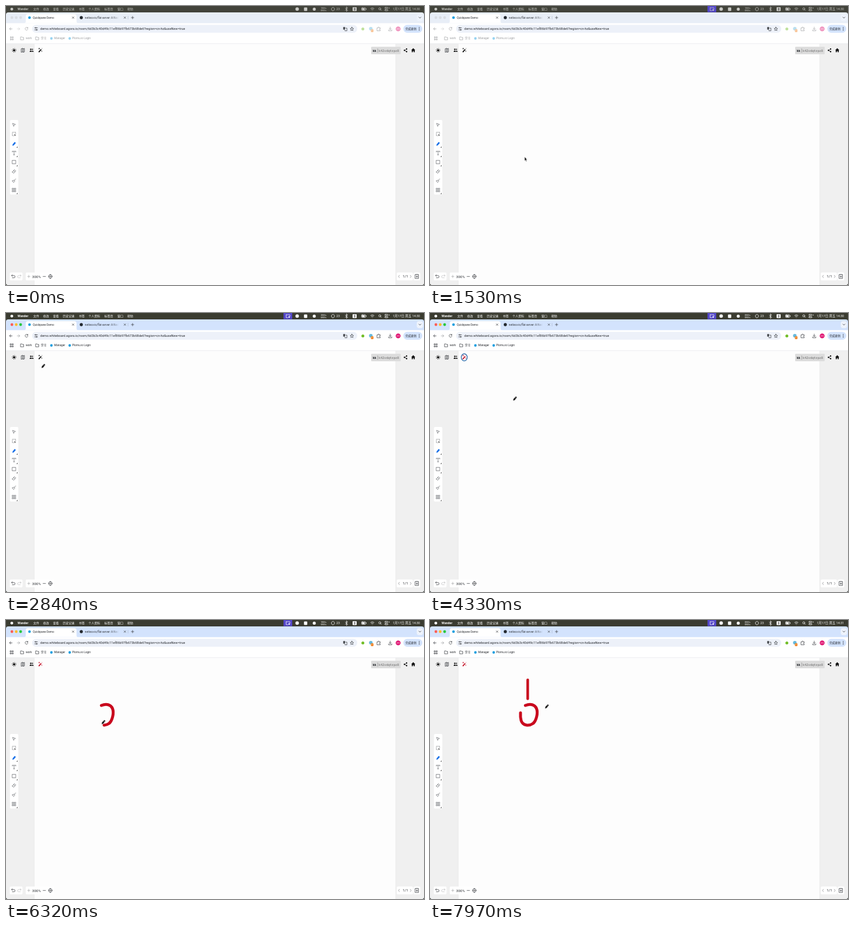
Animation, 720 px wide and 480 px high, one loop 8 s. Source, as an HTML page:

```html
<!DOCTYPE html>
<html lang="zh">
<head>
<meta charset="utf-8">
<title>Whiteboard</title>
<style>
  html, body { margin: 0; width: 100%; height: 100%; overflow: hidden; background: #fdfdfd; }
  svg {
    display: block; width: 100%; height: 100%;
    --menu: #3b3c31; --strip: #d3e3fd; --ink: #fff;
    --red: #fe5f57; --amber: #febc2e; --green: #28c840; --dim: 1;
  }
  svg.idle {
    --menu: #42433b; --strip: #e8eef7; --ink: #c9c9c5;
    --red: #d9dde3; --amber: #d9dde3; --green: #d9dde3; --dim: .45;
  }
  text { font-family: Roboto, "Noto Sans CJK SC", "Noto Sans CJK", sans-serif; white-space: pre; }
  .mono { font-family: "Noto Sans Mono", "Liberation Mono", monospace; }
  .bold { font-weight: 700; }
  .line { fill: none; stroke: #3a3d42; stroke-width: .75; stroke-linecap: round; stroke-linejoin: round; }
  .tools .line { stroke: #606367; stroke-width: .7; }
  .menu .line { stroke: var(--ink); }
  .menu .solid, .menu text { fill: var(--ink); }
  .dim { opacity: var(--dim); }
  .mark { fill: none; stroke: #c90a1e; stroke-width: 5; stroke-linecap: round; stroke-linejoin: round; }
</style>
</head>
<body>
<svg id="stage" class="idle" viewBox="0 0 720 480" preserveAspectRatio="none">
  <defs>
    <linearGradient id="fade"><stop offset=".82" stop-color="#30343a"/><stop offset="1" stop-color="#30343a" stop-opacity="0"/></linearGradient>
  </defs>
  <rect width="720" height="480" fill="#3b3c31"/>

  <g class="menu">
    <rect width="720" height="11" fill="var(--menu)"/>
    <circle class="solid" cx="10" cy="5.3" r="2.4"/>
    <g id="recorder">
      <rect x="478" width="15" height="10.6" fill="#5448c8"/>
      <path class="line" d="M482.5 3h6.5v3M482.5 3v5h3"/>
      <circle class="solid" cx="487.7" cy="7" r="1.3"/>
    </g>
    <circle class="solid" cx="501.5" cy="5.3" r="3"/>
    <rect class="solid" x="513.3" y="2.4" width="5.6" height="6" rx="1"/>
    <circle class="solid" cx="531" cy="5.4" r="2.6"/>
    <path class="line" d="M562 8l-1-1a2.8 2.8 0 1 1 3.8 .6zM584.5 3.4l4 4-2 1.8V1.6l2 1.8-4 4"/>
    <rect class="solid" x="597" y="2" width="7" height="6.8" rx="1"/>
    <path d="M599 4h3.4M599 6.4h3.4M600.7 3v5" stroke="#333" stroke-width=".6"/>
    <rect class="line" x="612.5" y="3" width="7" height="4.6" rx="1"/>
    <rect class="solid" x="613.3" y="3.8" width="4.6" height="3"/>
    <path class="line" d="M620.6 4.7v1.2M628 4.2q3-2.6 6 0M629.2 5.9q1.8-1.5 3.6 0M631 7.8v.1M646.3 7.5l-1.3-1.3"/>
    <circle class="line" cx="643.8" cy="4.8" r="1.8"/>
    <rect class="line" x="652.5" y="2.4" width="5.4" height="2" rx="1"/>
    <rect class="line" x="652.5" y="6.2" width="5.4" height="2" rx="1"/>
    <circle class="line" cx="660" cy="3.4" r=".3"/>
  </g>

  <rect y="11" width="720" height="469" rx="4" fill="var(--strip)"/>
  <g>
    <circle cx="10.2" cy="20" r="2.4" fill="var(--red)"/>
    <circle cx="17.6" cy="20" r="2.4" fill="var(--amber)"/>
    <circle cx="25.2" cy="20" r="2.4" fill="var(--green)"/>
  </g>
  <path d="M31 29.500q3 0 3-3V18q0-4 4-4h79.500q4 0 4 4v8.500q0 3 3 3z" fill="#fff"/>
  <circle cx="40.500" cy="20" r="2.300" fill="#1c9fe0"/>
  <circle cx="129.700" cy="20" r="2.700" fill="#24292f"/>
  <path class="line" d="M114.200 18.600l2.800 2.800m0-2.800l-2.800 2.800M203.300 18.600l2.800 2.800m0-2.800l-2.800 2.800M215.800 20h4.400M218 17.800v4.400"/>
  <path d="M210.200 17v6" stroke="#a9b6cc" stroke-width=".6"/>
  <rect x="707.500" y="14" width="11" height="12" rx="4" fill="#eef3fc"/>
  <path class="line" d="M711.200 19l1.800 1.900 1.800-1.900"/>

  <path d="M0 29.400H720V65H0z" fill="#fff"/>
  <rect x="45" y="32.500" width="560" height="13.500" rx="6.500" fill="#edf1f9"/>
  <path class="line" d="M49.200 37.600h1.200m1.800 0h2.200M49.200 41h2.200m1.800 0h1.200"/>
  <circle class="line" cx="51.200" cy="37.600" r=".8"/>
  <circle class="line" cx="52.400" cy="41" r=".8"/>
  <g class="dim">
    <path class="line" d="M10.600 39.300H6.200m2-2.200l-2 2.200 2 2.200M37.400 37.800a2.400 2.500 0 1 0 .3 2M37.600 36.500v1.600h-1.500"/>
    <path class="line" d="M19.200 39.300h4.400m-2-2.200l2 2.200-2 2.200" opacity=".45"/>
    <path class="line" d="M661.800 36.200v4.300m-1.800-1.600l1.800 1.700 1.800-1.700M659 41v1.700h5.600V41M639.400 37.600h1.700q-.3-1.500.9-1.500t.9 1.500h1.700v1.700q-1.400-.1-1.400.9t1.400.9v1.600h-5.200z"/>
    <circle cx="614.700" cy="39.600" r="2.500" fill="#72bd28"/>
    <circle cx="628.400" cy="39" r="3.100" fill="#68b9dc"/>
    <rect x="628.500" y="40" width="4.400" height="5" rx="1" fill="#f08020"/>
    <circle cx="675.500" cy="39.400" r="4.200" fill="#df1773"/>
  </g>
  <path class="line" d="M595.800 36.300l.9 2 2 .3-1.500 1.400.4 2.200-1.800-1-1.800 1 .4-2.200-1.500-1.400 2-.3z"/>
  <rect x="580.800" y="36.200" width="3.300" height="4.400" fill="#4a4d52"/>
  <path class="line" d="M585.200 38h2v4.700h-3.400v-1"/>
  <rect x="684.500" y="32.500" width="32.500" height="13.500" rx="6.500" fill="#d3e3fd"/>
  <path d="M711.800 37v.1m0 2.200v.1m0 2.200v.1" stroke="#222" stroke-width="1.300" stroke-linecap="round"/>

  <g class="dim">
    <path class="line" d="M7.400 53h1.700v1.700H7.400zM10.800 53h1.700v1.700h-1.700zM7.400 56.600h1.700v1.700H7.400zM10.800 56.600h1.700v1.700h-1.700z"/>
    <path class="line" id="folder" d="M25.400 53.200h1.900l.7.800h2.400v4.200h-5z"/>
    <use href="#folder" x="26"/>
    <circle cx="78.200" cy="55.700" r="2.200" fill="#1c9fe0"/>
    <circle cx="109.700" cy="55.700" r="2.200" fill="#1c9fe0"/>
  </g>

  <path d="M0 65H720V476q0 4-4 4H4q-4 0-4-4z" fill="#f0f0f0"/>
  <rect x="48.800" y="65" width="622.400" height="415" fill="#fdfdfd"/>
  <path d="M48.600 65v415M671.400 65v415" stroke="#e9e9e9" stroke-width=".7"/>
  <path d="M0 64.700h720" stroke="#e4e6ea" stroke-width=".7"/>

  <circle cx="14" cy="76.200" r="1.900" fill="#111"/>
  <circle cx="14" cy="76.200" r="3.200" fill="none" stroke="#111" stroke-width="1.200" stroke-dasharray=".9 1.613"/>
  <path class="line" d="M26.500 73.500l1.700-.6 1.800.7 1.800-.7v6l-1.800.7-1.800-.7-1.700.7zM28.200 73v5.800M30 73.600v5.900"/>
  <g fill="#222"><circle cx="42.700" cy="74.600" r="1.300"/><circle cx="45.600" cy="74.600" r="1.100"/><path d="M40.600 79q0-2.500 2.100-2.500t2.100 2.500zM45.200 79q0-1.600-.4-2.200 2.700-.5 2.700 2.200z"/></g>
  <g id="wand">
    <ellipse id="ring" cx="59" cy="76.200" rx="5.100" ry="6.100" fill="#fff" stroke="#195fa5" stroke-width="1.200"/>
    <path d="M56.400 79.300l4.300-4.700" stroke="currentColor" stroke-width="1.800"/>
    <path d="M57.200 72.300v2m-.9-1h1.800M62 73v.1M61.700 77.100v1.500" stroke="currentColor" stroke-width=".7" stroke-linecap="round"/>
  </g>
  <rect x="629" y="70.300" width="50.800" height="12.600" rx="1" fill="#dcdcdc"/>
  <path d="M640.200 73.200v7" stroke="#777" stroke-width=".6"/>
  <path d="M690 74l-3.600 2.200 3.600 2.300" class="line"/>
  <g fill="#111"><circle cx="690" cy="74" r="1.200"/><circle cx="686.400" cy="76.200" r="1.200"/><circle cx="690" cy="78.500" r="1.200"/><path d="M701.500 72.500l3.500 3.500h-.9v3.500h-1.800v-2h-1.600v2h-1.800V76H698z"/></g>

  <g class="tools">
    <rect x="6.800" y="196" width="14.400" height="128.500" rx="2" fill="#fff"/>
    <path class="line" d="M11.700 202l4.600 1.700-2 .9-.9 2.200z"/>
    <path class="line" d="M13 223.200h-2v-6h5.600v2.300" stroke-dasharray="1 1.500"/>
    <path d="M14 220.500l3.600 1.400-1.600.7-.8 1.700z" fill="#555"/>
    <path d="M10.900 240.400l.7-2.700 3.400-4 2 2-3.600 4z" fill="#1a72e8"/>
    <path d="M11 250h5.800M11 250v1.200M16.800 250v1.200M13.900 250v6M12.800 256h2.200" class="line"/>
    <rect class="line" x="11" y="265.500" width="5.800" height="6"/>
    <path class="line" d="M11 285.500l3.300-3.900 2.500 2-3.200 4q-2.200-.2-2.600-2.100zM13 283.200l2.500 2.200M16.800 297.400l-2.500 2.700m-3.300.6q2.400-.1 3-1.200l1.200 1.300q-.5 2-2 2.700zM11 313.600h2.200v2.300H11zM14.600 313.600h2.200v2.300h-2.200zM11 317.300h2.200v2.300H11zM14.600 317.300h2.200v2.300h-2.200z"/>
    <path d="M20 241.500v2.200h-2zM20 257.500v2.200h-2zM20 273.500v2.200h-2zM20 321.300v2.200h-2z" fill="#444"/>
  </g>

  <g fill="#fff"><rect x="6.500" y="458.500" width="22" height="13.500" rx="2"/><rect x="34" y="458.500" width="49" height="13.500" rx="2"/><rect x="673" y="458.500" width="28" height="13.500" rx="2"/><rect x="702" y="458.500" width="11.500" height="13.500" rx="2"/></g>
  <path class="line" id="undo" d="M11 462.200l-1.500 1.600 1.500 1.500M9.700 463.800h4.100q1.800 0 1.800 1.900t-1.800 1.900h-3"/>
  <use href="#undo" transform="matrix(-1 0 0 1 35.500 0)" opacity=".3"/>
  <path class="line" d="M37 465.300h4.400M39.200 463v4.600" opacity=".4"/>
  <path class="line" d="M63.800 465.300h4.400M76.400 461.500v1.500m0 4.500v1.500m-3.300-3.700h1.500m3.600 0h1.500"/>
  <ellipse class="line" cx="76.400" cy="465.300" rx="2.900" ry="3.200"/>
  <circle cx="76.400" cy="465.300" r="1" fill="#333"/>
  <path class="line" d="M677.600 463.200l-1.500 2.100 1.500 2.100M696.400 463.200l1.500 2.100-1.500 2.100" opacity=".6"/>
  <path class="line" d="M705 462h5.600v6.800H705zM707.800 464v3.200m-1.500-1.600h3M706.500 461.900v-.4m2.600.4v-.4"/>

  <g id="labels"></g>

  <path id="bowl" class="mark" pathLength="1" d="M164.300 147C172.500 143.700 180.500 145 183.500 152.500C186.500 160 183 173.500 177.500 178C171 182.500 160 182.500 157 173Q155.400 167.500 155.900 159.700"/>
  <path id="stem" class="mark" pathLength="1" d="M168.300 103V135.500" style="stroke-width:4.500"/>

  <path id="arrow" d="M0 0V7l1.500-1.400 1 2.500 1.200-.5-1.100-2.400h1.900z" fill="#111" stroke="#fff" stroke-width=".5"/>
  <g id="pencil">
    <path d="M0 0L.4-3 4.100-7.100q.9-.9 1.900.1 1.100 1 .3 2L2.800-.8z" fill="#181818" stroke="#fff" stroke-width=".5"/>
    <path d="M3.400-6l2 1.800" stroke="#fff" stroke-width=".5"/>
  </g>
</svg>
<script>
const $ = id => document.getElementById(id);
const stage = $('stage');
const NS = 'http://www.w3.org/2000/svg';

// y is the vertical middle of the text
function label(x, y, size, content, { fill = '#25282d', cls = '', parent = $('labels') } = {}) {
  const el = document.createElementNS(NS, 'text');
  el.setAttribute('x', x);
  el.setAttribute('y', y + size * .36);
  el.setAttribute('font-size', size);
  el.setAttribute('fill', fill);
  el.setAttribute('class', cls);
  el.textContent = content;
  parent.append(el);
  return el;
}

const menu = { parent: document.querySelector('.menu') };
label(20, 5.2, 5.4, 'Wander', { ...menu, cls: 'bold' });
[[47, '文件'], [64, '修改'], [81, '查看'], [98, '历史记录'], [125.5, '书签'], [142, '个人资料'], [169.5, '标签页'], [192, '窗口'], [209, '帮助']]
  .forEach(([x, name]) => label(x, 5.2, 5, name, menu));
label(569, 5.3, 5.3, '23', menu);
const clock = label(666.3, 5.2, 5.4, '', menu);
const upload = label(542.3, 3.3, 3.5, '', menu);
const download = label(542.3, 7.6, 3.5, '', menu);

label(46.3, 20, 4.8, 'Quickpane Demo');
label(135.8, 20, 4.7, 'netless-io/flat-server: A Nod', { fill: 'url(#fade)' });
label(59, 39.4, 5.55, 'demo.whiteboard.agora.io/room/6d3b3c40d49c11ef86b97fb673b68de6?region=cn-hz&useNew=true');
label(688, 39.4, 4.8, '完成更新');
label(672.8, 39.5, 3.2, '275', { fill: '#fff' });
label(629.6, 42.6, 3.6, '1', { fill: '#fff', cls: 'dim' });
[[34, 'work'], [60, '学习'], [83, 'Manager'], [114, 'Plomu.io Login']]
  .forEach(([x, name]) => label(x, 55.7, 4.8, name, { cls: 'dim' }));
label(631.7, 76.6, 5.5, 'kk', { cls: 'bold' });
label(642, 76.6, 5.3, 'k42vdqtrpz8', { fill: '#666', cls: 'mono' });
label(45, 465.3, 6.2, '300%');
label(683.3, 465.3, 6, '1/1');

const LOOP = 8000, FOCUS = 2200, PICK = 3420, TOUCH = 5550;

const pointer = [
  [550, 204, 482], [720, 193, 428], [1340, 171, 310], [1530, 163, 259.500], [2120, 143, 200], [2200, 140, 199],
  [2840, 61, 95], [3010, 60, 90], [3250, 58, 77], [3770, 58, 78], [3850, 62, 82],
  [4330, 143, 151], [4490, 149, 167], [4710, 149, 167], [5100, 158, 232], [5450, 164, 147], [TOUCH, 164, 147],
  [6660, 156, 160], [6830, 156, 160], [7080, 168, 103], [7150, 168, 103], [7500, 168, 135.500],
  [7670, 169, 137], [7800, 186, 157], [7970, 198, 152.500]
];
const bowlSteps = [[TOUCH, 0], [6320, .67], [6660, 1]];
const stemSteps = [[7150, 0], [7500, 1]];
const speeds = [[0, '1KB/s', '0KB/s'], [1800, '2KB/s', '6KB/s'], [3800, '0KB/s', '0KB/s'], [5800, '1KB/s', '5KB/s'], [7800, '0KB/s', '0KB/s']];

function sample(steps, t) {
  const i = steps.findIndex(step => step[0] > t);
  if (i === 0) return steps[0].slice(1);
  if (i < 0) return steps.at(-1).slice(1);
  const [a, b] = [steps[i - 1], steps[i]];
  const k = (t - a[0]) / (b[0] - a[0]);
  return a.slice(1).map((v, j) => v + (b[j + 1] - v) * k);
}

const show = (el, on) => { el.style.display = on ? '' : 'none'; };

function reveal(el, part) {
  show(el, part > 0);
  el.style.strokeDasharray = part < 1 ? `${part} 2` : 'none';
}

const bowlLength = $('bowl').getTotalLength();

function render(t) {
  stage.classList.toggle('idle', t < FOCUS);
  show($('recorder'), t >= 40);
  show($('ring'), t >= PICK && t < TOUCH);
  $('wand').style.color = t < PICK ? '#111' : '#c5162b';
  clock.textContent = '1月17日 周五 14:3' + (t < 6500 ? 0 : 1);
  const speed = speeds.findLast(s => s[0] <= t);
  upload.textContent = speed[1];
  download.textContent = speed[2];

  const [bowl] = sample(bowlSteps, t);
  reveal($('bowl'), bowl);
  reveal($('stem'), sample(stemSteps, t)[0]);

  // the ink trails a little behind the pencil
  let [x, y] = sample(pointer, t);
  if (bowl > 0 && bowl < 1) {
    const tip = $('bowl').getPointAtLength(Math.min(1, bowl + .05) * bowlLength);
    [x, y] = [tip.x, tip.y - 1];
  }
  const overButton = t > 3100 && t < 3860;
  const arrow = t < FOCUS || overButton;
  show($('arrow'), arrow && t >= 550);
  show($('pencil'), !arrow);
  $(arrow ? 'arrow' : 'pencil').setAttribute('transform', `translate(${x} ${y})`);
}

const start = performance.now();
function tick() {
  render((performance.now() - start) % LOOP);
  requestAnimationFrame(tick);
}
tick();
</script>
</body>
</html>
```
